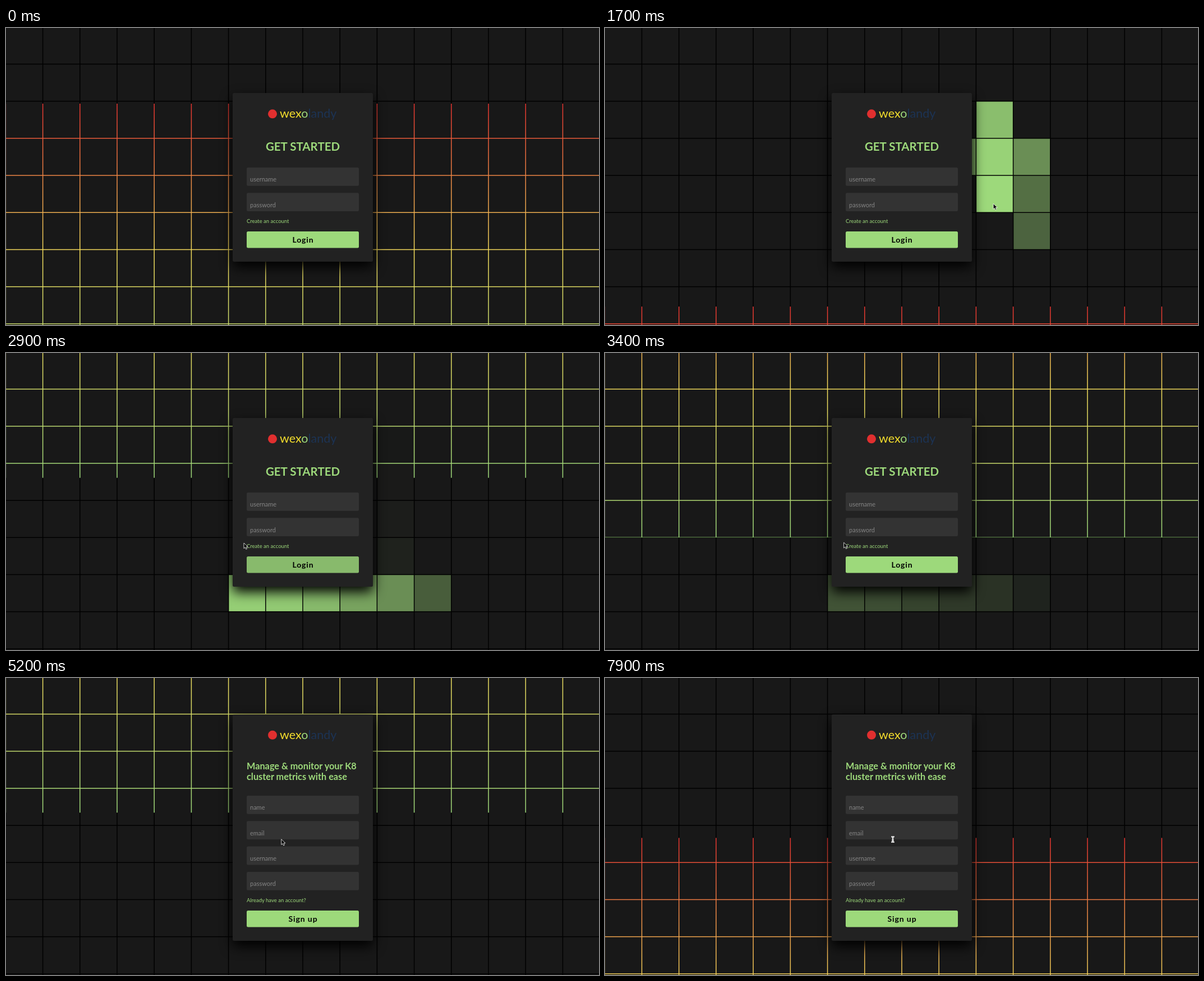
Recreate the animation shown at these times as an HTML page. Size 1057x530 px, loop 8000 ms.

```html
<!DOCTYPE html>
<html lang="en">
<head>
<meta charset="utf-8">
<title>Login and sign up</title>
<style>
  html, body { margin: 0; width: 100%; height: 100%; overflow: hidden; background: #000; }
  #stage { position: relative; width: 1057px; height: 530px; overflow: hidden; }
  svg { position: absolute; left: 0; top: 0; width: 1057px; height: 530px; }
  .card {
    position: absolute; left: 404px; width: 250px; border-radius: 2.5px;
    background: #222; box-shadow: 0 9.4px 22px #000;
  }
  text { font-family: Lato, "Open Sans", sans-serif; white-space: pre; }
  .logo { font-size: 21.5px; }
  .head { font-size: 20.5px; font-weight: 700; fill: #9dd97b; text-anchor: middle; }
  .lead { font-size: 16.3px; font-weight: 700; fill: #9dd97b; }
  .hint { font-size: 11px; fill: #858585; }
  .link { font-size: 9.5px; fill: #9dd97b; }
  .label { font-size: 14px; font-weight: 700; letter-spacing: .9px; text-anchor: middle; }
  .url { font: 7.9px "Liberation Sans", Arial, sans-serif; fill: #4a4d51; }
</style>
</head>
<body>
<div id="stage">
  <svg>
    <defs>
      <linearGradient id="glow" x1="0" y1="0" x2="0" y2="1">
        <stop offset="0" stop-color="#e5322f"/>
        <stop offset=".5" stop-color="#f3dc5c"/>
        <stop offset="1" stop-color="#9dd97b"/>
      </linearGradient>
    </defs>
    <rect width="1057" height="530"/>
    <rect id="beam" width="1057" height="530" fill="url(#glow)"/>
    <g id="tiles"></g>
  </svg>
  <div class="card" id="card"></div>
  <svg>
    <g id="login"></g>
    <g id="signup"></g>
    <g id="status">
      <rect x="-3" y="523" width="88.5" height="12" rx="2.5" fill="#dee1e6"/>
      <text class="url" x="2" y="530.8">localhost:8080/signup</text>
    </g>
    <path id="arrow" d="M0 0V9.8L2.3 7.7 3.8 11.2 5.6 10.4 4.1 7H7.2Z" stroke="#fff" stroke-width=".8"/>
    <g id="caret" fill="none">
      <path id="bar" d="M-2.5-4.800Q0-4.800 0-3Q0-4.800 2.500-4.800M0-3V3M-2.500 4.800Q0 4.800 0 3Q0 4.800 2.500 4.800M-1.500 1.300H1.500" stroke="#ddd" stroke-width="2.2"/>
      <use href="#bar" style="stroke: #000"/>
    </g>
  </svg>
</div>
<script>
const LOOP = 8000, STEP = 100, SWITCH = 4072, SPEED = 0.213;
const H = 530, PITCH = 66.2, SIZE = 64.7, COLS = 16, ROWS = 9, LEFT = -0.6, TOP = -1.75;
const FADE = 1500, DARK = [24, 24, 24], GREEN = [157, 217, 123];
const $ = id => document.getElementById(id);

// Pointer key points: time, x, y. Tile and button highlights follow from it.
const PATH = [
  [150, 826, 490], [300, 800, 560], [1140, 780, 560], [1150, 780, 370],
  [1200, 773.5, 273.5], [1340, 730, 205], [1420, 655, 205], [1470, 690, 168],
  [1900, 694, 440], [1960, 735, 435], [2345, 728, 427], [2540, 661.5, 429],
  [2780, 450, 426], [2900, 424, 339], [3500, 426, 338], [3700, 478, 341],
  [4300, 479.5, 340], [4700, 490, 288], [6300, 492.5, 287], [7900, 513, 288]
];

function add(parent, tag, attrs, content = "") {
  const el = document.createElementNS("http://www.w3.org/2000/svg", tag);
  for (const key in attrs) el.setAttribute(key, attrs[key]);
  el.innerHTML = content;
  return parent.appendChild(el);
}

const label = (g, cls, x, y, str) => add(g, "text", { class: cls, x, y }, str);

const box = (g, y, height, fill) =>
  add(g, "rect", { x: 429, y, width: 200, height, rx: 2.5, fill });

function logo(g, y) {
  add(g, "circle", { cx: 475, cy: y - 7, r: 8, fill: "#e12f2f" });
  label(g, "logo", 488, y,
    '<tspan fill="#f3dc2c">wex</tspan><tspan fill="#9dd97b">o</tspan><tspan fill="#1c3354">landy</tspan>');
}

function fields(g, y, hints) {
  hints.forEach((hint, i) => {
    box(g, y + 45.3 * i, 32.8, "#333");
    label(g, "hint", 435, y + 45.3 * i + 25.4, hint);
  });
}

function button(g, y, str) {
  const rect = box(g, y, 29.4, "#9dd97b");
  label(g, "label", 529.5, y + 20.2, str);
  return rect;
}

const login = $("login"), signup = $("signup");
logo(login, 160.3);
label(login, "head", 529, 219, "GET STARTED");
fields(login, 249, ["username", "password"]);
label(login, "link", 429, 348, "Create an account");
const loginButton = button(login, 363, "Login");

logo(signup, 108.8);
label(signup, "lead", 429, 163, "Manage &amp; monitor your K8");
label(signup, "lead", 429, 181.8, "cluster metrics with ease");
fields(signup, 210, ["name", "email", "username", "password"]);
label(signup, "link", 429, 400, "Already have an account?");
button(signup, 415, "Sign up");

const inset = (PITCH - SIZE) / 2;
const tiles = Array.from({ length: COLS * ROWS }, (_, i) => add($("tiles"), "rect", {
  x: LEFT + inset + PITCH * (i % COLS),
  y: TOP + inset + PITCH * Math.floor(i / COLS),
  width: SIZE, height: SIZE
}));

// The CSS "ease" curve, solved by bisection.
function ease(p) {
  let lo = 0, hi = 1;
  const curve = (u, a, b) => 3 * a * u * (1 - u) ** 2 + 3 * b * u * u * (1 - u) + u ** 3;
  for (let i = 0; i < 20; i++) {
    const mid = (lo + hi) / 2;
    if (curve(mid, 0.25, 0.25) < p) lo = mid; else hi = mid;
  }
  return curve(lo, 0.1, 1);
}

function pointer(t) {
  const i = PATH.findIndex(p => p[0] >= t);
  if (i < 1) return [0, -50];
  const [t0, x0, y0] = PATH[i - 1], [t1, x1, y1] = PATH[i];
  const k = (t - t0) / (t1 - t0);
  return [x0 + (x1 - x0) * k, y0 + (y1 - y0) * k];
}

const inside = ([x, y], x0, y0, x1, y1) => x >= x0 && x < x1 && y >= y0 && y < y1;

function tileAt(p) {
  if (!inside(p, 0, 0, 1057, H) || inside(p, 404, 116, 654, 417)) return -1;
  return Math.floor((p[1] - TOP) / PITCH) * COLS + Math.floor((p[0] - LEFT) / PITCH);
}

// Each tile lights at once under the pointer and eases back after it leaves.
function tileGlow(t) {
  const glow = {};
  for (let ago = FADE; ago >= 0; ago -= 10) glow[tileAt(pointer(t - ago))] = 1 - ease(ago / FADE);
  return glow;
}

const mix = k => `rgb(${DARK.map((d, i) => Math.round(d + (GREEN[i] - d) * k))})`;
const show = (el, on) => { el.style.display = on ? "" : "none"; };

function draw(t) {
  const joined = t >= SWITCH;
  const travel = joined ? (t - SWITCH) * SPEED : 665 + t * SPEED;
  $("beam").setAttribute("y", travel % (2 * H) - H);

  const glow = joined ? {} : tileGlow(t);
  tiles.forEach((el, i) => el.setAttribute("fill", mix(glow[i] || 0)));

  $("card").style.top = (joined ? 65 : 116.3) + "px";
  $("card").style.height = (joined ? 404.3 : 301) + "px";
  show(login, !joined);
  show(signup, joined);
  // The button's highlight trails the pointer a little.
  loginButton.setAttribute("opacity", inside(pointer(t - 40), 429, 363, 629, 392) ? 0.83 : 1);
  $("status").setAttribute("opacity", t < 3700 ? 0 : Math.max(0, Math.min(1, (4200 - t) / 200)));

  const typing = t >= 7000;
  for (const id of ["arrow", "caret"]) {
    $(id).setAttribute("transform", `translate(${pointer(t)})`);
    show($(id), typing === (id === "caret"));
  }
}

let last = -1;
function tick() {
  const t = Math.floor(performance.now() % LOOP / STEP) * STEP;
  if (t !== last) draw(last = t);
  requestAnimationFrame(tick);
}
tick();
</script>
</body>
</html>
```
